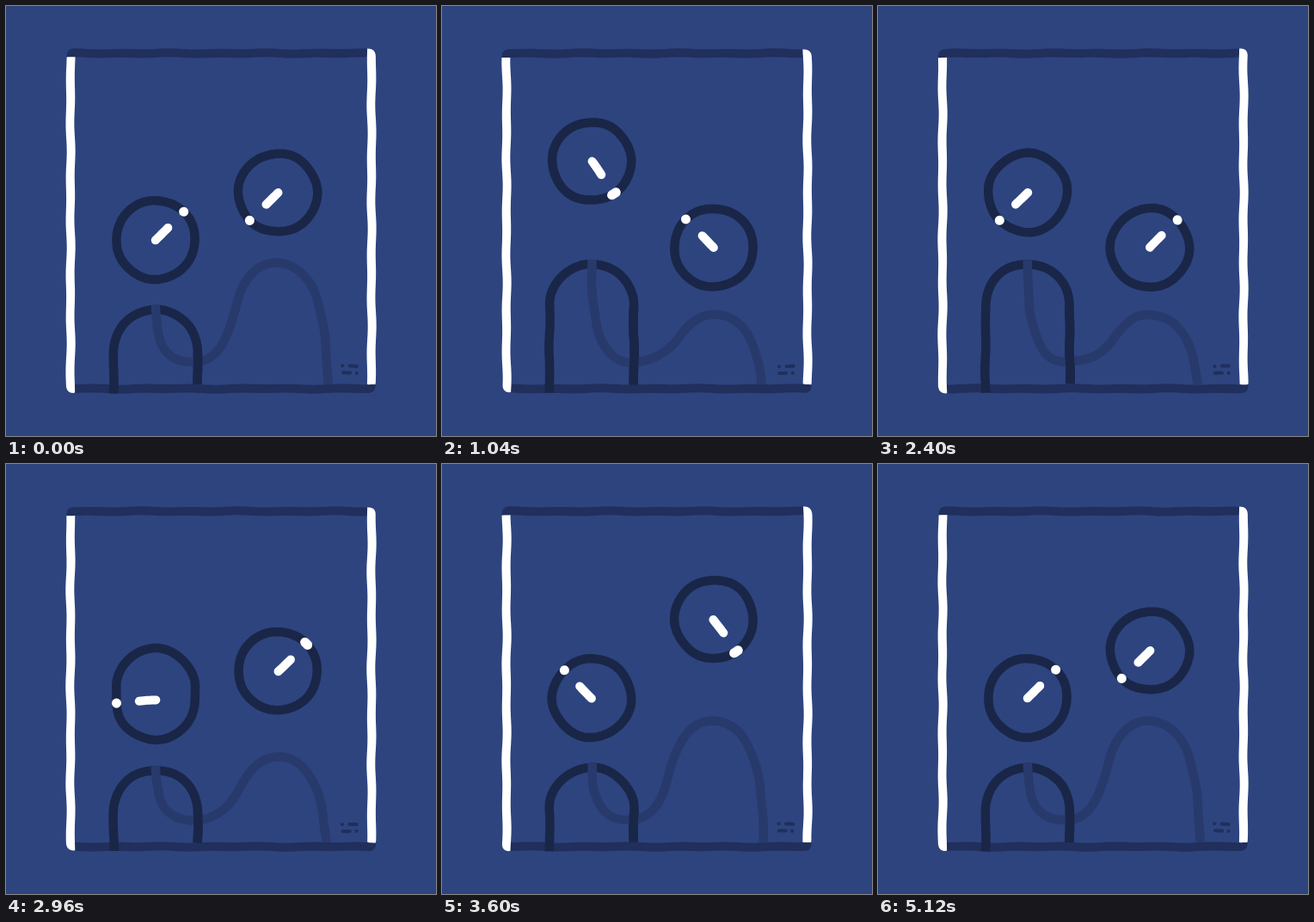
Recreate the animation shown at these times as an HTML page. Size 500 by 500 pixels, loop 5200 ms.

```html
<!DOCTYPE html>
<html lang="en">
<head>
<meta charset="utf-8">
<title>Two heads</title>
<style>
  html, body { margin: 0; width: 100%; height: 100%; overflow: hidden; background: #2d447f; }
  svg { display: block; width: 100vw; height: 100vh; }
  path { fill: none; }
  .dark { stroke: #1a2647; stroke-width: 10.5; }
  .faint { stroke: #283a6c; stroke-width: 10.5; }
  .mark { stroke: #202f5b; stroke-width: 4; stroke-linecap: round; }
  .dot, .bar { stroke: #fff; stroke-width: 11; stroke-linecap: round; }
  .bar { stroke-width: 10; }
  .beam { fill: #202f5b; }
  .post { fill: #fff; }
</style>
</head>
<body>
<svg id="stage" viewBox="0 0 500 500"></svg>
<script>
const FRAME = 80, FRAMES = 65, HALF = 32;
const R = 45.7, HIGH = 217, APEX = 180.5;
const SVG = 'http://www.w3.org/2000/svg';
const stage = document.getElementById('stage');
const scratch = document.createElementNS(SVG, 'path');

const lerp = (a, b, k) => a + (b - a) * k;
const ease = (t, from, to) => {
  const s = Math.min(1, Math.max(0, (t - from) / (to - from)));
  return s * s * (3 - 2 * s);
};
// Quick move from 0 to 1 with one small overshoot.
const settle = t => t <= 0 ? 0 : 1 - Math.cos(0.42 * t) * Math.exp(-t * t / 11);

function addPath(cls) {
  const el = document.createElementNS(SVG, 'path');
  el.setAttribute('class', cls);
  return stage.appendChild(el);
}

// Hand-drawn look: resample a path and push its points along smooth waves.
let seed = 0;
const wave = (u, v, phase) => 0.4 * Math.sin(u / 9 + v / 40 + phase) + 0.3 * Math.sin(u / 17 - v / 30 + 2 * phase);
function sketch(el, d) {
  scratch.setAttribute('d', d);
  const length = scratch.getTotalLength(), steps = Math.max(1, Math.ceil(length / 2.5));
  const points = [];
  for (let i = 0; i <= steps; i++) {
    const { x, y } = scratch.getPointAtLength(length * i / steps);
    const px = x + wave(y, x, seed * 2.4), py = y + wave(x, y, seed * 3.7 + 1);
    points.push(px.toFixed(2) + ' ' + py.toFixed(2));
  }
  el.setAttribute('d', 'M' + points.join('L') + (d.endsWith('Z') ? 'Z' : ''));
}

const still = [
  ['beam', 'M70 60V59Q70 50 79 50H420V60Z'],
  ['beam', 'M80 440H430V441Q430 450 421 450H80Z'],
  ['post', 'M70 60H80V450H79Q70 450 70 441Z'],
  ['post', 'M420 50H421Q430 50 430 59V440H420Z'],
  ['mark', 'M391.5 419h.1'], ['mark', 'M400 419h8'],
  ['mark', 'M392 427h8'], ['mark', 'M407.500 427h.1']
].map(([cls, d]) => ({ el: addPath(cls), d }));

const arch = addPath('dark'), curve = addPath('faint'), leg = addPath('dark');

const makeHead = (x, low, bodyLow, bodyHigh) => ({
  x, low, bodyLow, bodyHigh,
  ring: addPath('dark'), dot: addPath('dot'), bar: addPath('bar')
});
const left = makeHead(174, 272, 353, 300);
const right = makeHead(316, 281, 359, 299);

function rise(who, t) {
  const y = lerp(who.low, APEX, ease(t, 0, 11.5)) + (HIGH - APEX) * settle(t - 15);
  return {
    crown: y, chin: y,
    body: lerp(who.bodyLow, who.bodyHigh, ease(t, 1, 12)),
    angle: -45 + 135 * ease(t, 4, 17.5) + 45 * ease(t, 21, 27),
    spread: 3.5 * (ease(t, 3, 6) - ease(t, 13, 18))
  };
}

function fall(who, t) {
  let angle = 135;
  for (let turn = 0; turn < 4; turn++) angle += 45 * ease(t, 7 * turn, 7 * turn + 6);
  return {
    crown: lerp(HIGH, who.low, settle(t - 2.3)),
    chin: lerp(HIGH, who.low, settle(t)),
    body: lerp(who.bodyHigh, who.bodyLow, settle(t)),
    angle, spread: 0
  };
}

function drawHead({ x, ring, dot, bar }, { crown, chin, angle, spread }) {
  const at = (r, deg) => {
    const a = deg * Math.PI / 180;
    return `${x + r * Math.cos(a)} ${chin + r * Math.sin(a)}`;
  };
  const arc = `A${R} ${R} 0 0 1`;
  sketch(ring, `M${x - R} ${crown}${arc} ${x + R} ${crown}V${chin}${arc} ${x - R} ${chin}Z`);
  sketch(dot, `M${at(R, angle - spread - 0.1)}${arc} ${at(R, angle + spread + 0.1)}`);
  sketch(bar, `M${at(0, angle)}L${at(19.5, angle)}`);
}

function drawBodies(a, b) {
  const shoulder = a + 49, start = a - 5;
  const mix = (tall, short) => lerp(tall, short, (b - right.bodyHigh) / 60);
  sketch(arch, `M125 450V${shoulder}A49 49 0 0 1 223 ${shoulder}V440`);
  sketch(leg, `M223 ${shoulder}V440`);
  sketch(curve, `M174 ${start}C174 ${lerp(start, 414, 0.72)} 187 414 219 414`
    + `C246 414 ${mix(258, 264)} ${mix(385, 402)} ${mix(265.5, 275)} ${mix(356, 386)}`
    + `C${mix(274, 287)} ${mix(322, 369)} ${mix(286, 297)} ${b} 316 ${b}`
    + `C${mix(355, 347)} ${b} ${mix(374, 365)} ${mix(352, 385)} ${mix(374, 372)} 440`);
}

function draw(frame) {
  const t = frame % HALF, leftRises = frame < HALF;
  const l = (leftRises ? rise : fall)(left, t), r = (leftRises ? fall : rise)(right, t);
  seed = Math.floor(frame / 2);
  still.forEach(({ el, d }) => sketch(el, d));
  drawBodies(l.body, r.body);
  drawHead(left, l);
  drawHead(right, r);
}

const begin = performance.now();
let shown = -1;
function tick() {
  const frame = Math.floor((performance.now() - begin) / FRAME) % FRAMES % (2 * HALF);
  if (frame !== shown) draw(shown = frame);
  requestAnimationFrame(tick);
}
tick();
</script>
</body>
</html>
```
